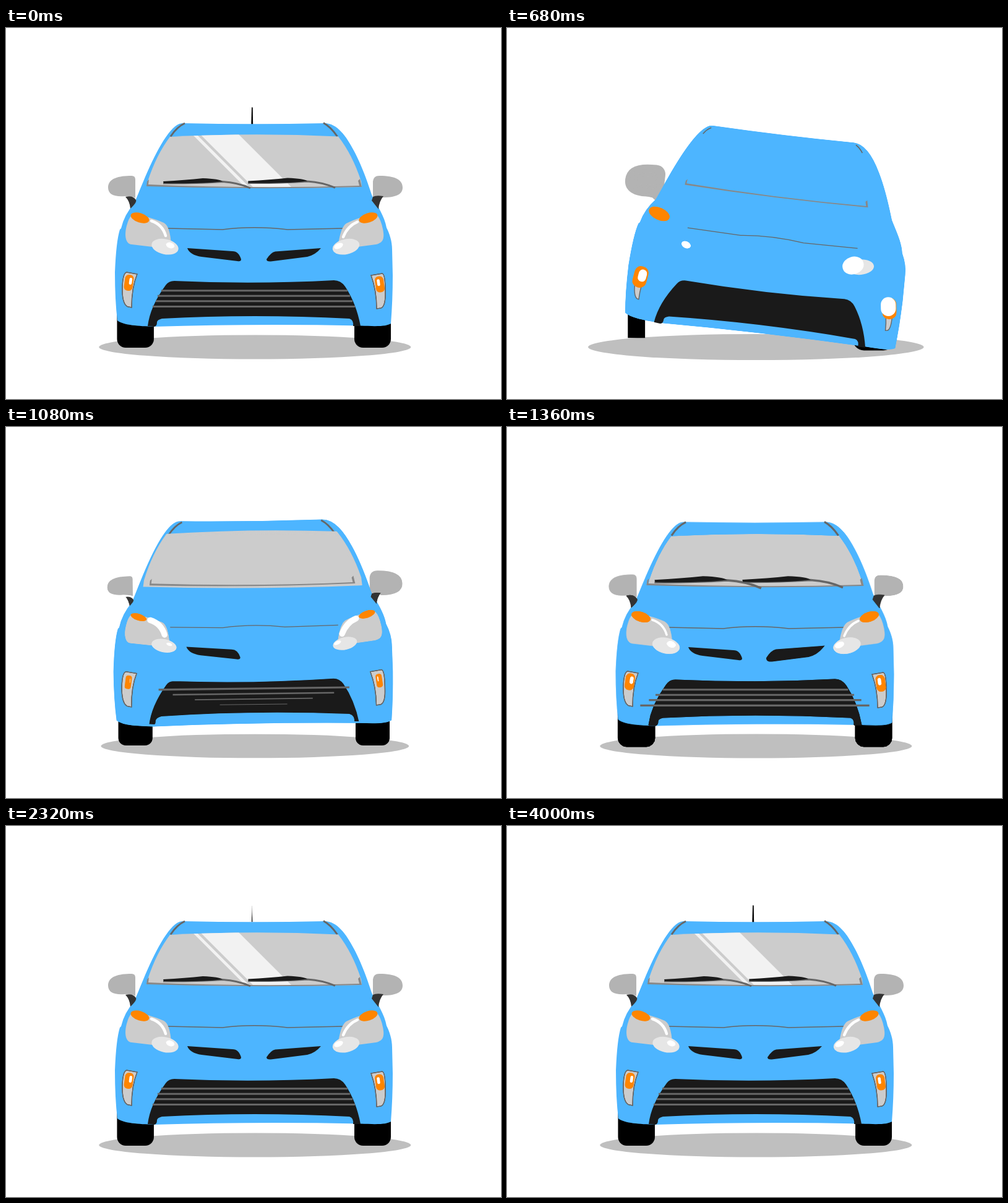
Animation of 800x600 px, one loop 4020 ms. Source, as an HTML page with a canvas:

```html
<!DOCTYPE html>
<html lang="en">
<head>
<meta charset="utf-8">
<title>Car assembly</title>
<style>
html, body { margin: 0; height: 100%; overflow: hidden; background: #fff; }
canvas { display: block; }
</style>
</head>
<body>
<canvas id="stage" width="800" height="600"></canvas>
<script>
const LOOP = 4020, STEP = 20;
const BLUE = '#4db5ff', ORANGE = '#ff8500', DARK = '#1a1a1a', GREY = '#ccc', LINE = '#666';
const ctx = document.getElementById('stage').getContext('2d');
const scratch = new OffscreenCanvas(800, 600).getContext('2d');

// Geometry helpers
const shape = d => new Path2D(d);
function ellipse(x, y, rx, ry, deg) {
  const p = new Path2D();
  p.ellipse(x, y, rx, ry, deg * Math.PI / 180, 0, 2 * Math.PI);
  return p;
}
function pill(x, y, w, h, r, deg = 0) {
  const box = new Path2D(), p = new Path2D();
  box.roundRect(-w / 2, -h / 2, w, h, r);
  p.addPath(box, new DOMMatrix().translate(x, y).rotate(deg));
  return p;
}

// Motion helpers
const spring = (age, k = 120, period = 560) =>
  age < 0 ? -1 : -(2 ** (-age / k)) * Math.cos(2 * Math.PI * age / period);

// Value through [time, value] keys: quick start, then soft swings
function track(t, keys) {
  if (t <= keys[0][0]) return keys[0][1];
  for (let i = 1; i < keys.length; i++) {
    const [t0, a] = keys[i - 1], [t1, b] = keys[i];
    if (t < t1) {
      const p = (t - t0) / (t1 - t0);
      const e = i === 1 ? Math.sin(p * Math.PI / 2) : (1 - Math.cos(p * Math.PI)) / 2;
      return a + (b - a) * e;
    }
  }
  return keys.at(-1)[1];
}

// Nested strokes close the gaps a single wide stroke leaves on tight curves
function strokeBand(c, path, reach) {
  for (const part of [1, 0.75, 0.5, 0.25]) {
    c.lineWidth = 2 * reach * part;
    c.stroke(path);
  }
}

// Fills a path grown (d > 0) or shrunk (d < 0) by d pixels along its outline
function fillOffset(path, color, d) {
  if (d >= 0) {
    ctx.fillStyle = ctx.strokeStyle = color;
    ctx.fill(path);
    if (d > 0.05) strokeBand(ctx, path, d);
    return;
  }
  scratch.resetTransform();
  scratch.clearRect(0, 0, 800, 600);
  scratch.setTransform(ctx.getTransform());
  scratch.fillStyle = color;
  scratch.fill(path);
  if (d < -0.05) {
    scratch.globalCompositeOperation = 'destination-out';
    strokeBand(scratch, path, -d);
    scratch.globalCompositeOperation = 'source-over';
  }
  ctx.save();
  ctx.resetTransform();
  ctx.drawImage(scratch.canvas, 0, 0);
  ctx.restore();
}

// Part kinds; each returns a function of time
const solid = (start, color, path) => t => {
  if (t >= start) fillOffset(path, color, 50 * spring(t - start));
};
const outlined = (start, path) => t => {
  if (t < start) return;
  const d = 70 * spring(t - start);
  fillOffset(path, LINE, d + 0.7);
  fillOffset(path, GREY, d - 0.7);
};
const streak = (start, path) => t => {
  const width = 4.5 + 100 * spring(t - start);
  if (width <= 0) return;
  ctx.lineCap = 'round';
  ctx.strokeStyle = '#fff';
  ctx.lineWidth = width;
  ctx.stroke(path);
  ctx.lineCap = 'butt';
};
const pop = (start, x, y, paint) => t => {
  if (t <= start) return;
  const s = 1 + spring(t - start);
  ctx.save();
  ctx.translate(x, y);
  ctx.scale(s, s);
  ctx.translate(-x, -y);
  paint();
  ctx.restore();
};
const line = (start, x, y, width, d) => {
  const path = shape(d);
  return pop(start, x, y, () => {
    ctx.strokeStyle = LINE;
    ctx.lineWidth = width;
    ctx.stroke(path);
  });
};

const bodyPath = shape('M287,154Q400,156.5 515,154C535,154 550,175 562,198C578,228 587,258 592,272C600,287 612,305 615,323C620,333 624,345 624,358L625,400Q625,440 622,478C615,482 605,483 573,481.5Q402,478 238,483C215,482 190,481 180,473Q176,440 176,395Q178,345 184,326L186,324Q191,302 207,284C211,275 216,262 222,248C240,205 262,162 280,155Q283,154 287,154Z');
const glass = shape('M265,176Q400,169 537,175.5Q560,205 574,248L575,257Q400,262 228,255L229,248Q243,205 265,176Z');
const strip = shape('M227,256L228,248L231,245L230,253Q400,260.5 571,255L569,247L572,244L575,257Q400,262 227,256Z');

const body = t => {
  if (t >= 200) fillOffset(bodyPath, BLUE, 226 * spring(t - 200, 120, 2000));
};

const shines = [
  solid(1230, '#f2f2f2', shape('M301,172L308,172L396,260L389,260Z')),
  solid(1310, '#f2f2f2', shape('M314,172L376,172L464,260L402,260Z'))
];
const reflection = t => {
  ctx.save();
  ctx.clip(glass);
  shines.forEach(draw => draw(t));
  ctx.restore();
};

const blade = shape('M254,248Q290,246 318,243Q345,244 350,248Q320,252 255,251Z');
const arm = shape('M254,251Q300,251.5 350,248.5Q375,250 395,259');
const wiper = (start, dx) => pop(start, 324 + dx, 251, () => {
  ctx.translate(dx, -dx / 270);
  ctx.strokeStyle = LINE;
  ctx.lineWidth = 3;
  ctx.stroke(arm);
  ctx.fillStyle = DARK;
  ctx.fill(blade);
});

const bars = [[251, 552, 424.7], [245, 556, 433.2], [242, 560, 441.7], [237, 564, 450.4]].map(
  ([x0, x1, y], i) => line(935 + 33 * i, (x0 + x1) / 2, y, 3, `M${x0},${y}H${x1}`));

const wheels = [
  solid(590, '#000', pill(209.2, 478.5, 59.5, 77, 14)),
  solid(520, '#000', pill(592.5, 478.5, 59, 77, 14))
];

const carParts = [
  solid(1670, '#000', shape('M396.3,156L397,129Q397.8,127 398.7,129L399.2,156Z')),
  solid(480, '#b3b3b3', shape('M165,258C165,243 182,239 203,239Q209,239 209,245L209,275Q205,272 192,272Q165,274 165,258Z')),
  solid(700, '#b3b3b3', shape('M593,275L593,248Q594,239 603,239C630,239 641,246 641,258C641,268 632,274 610,274Q600,271 593,275Z')),
  body,
  solid(620, '#333', shape('M193,273Q205,270 210,278Q212,282 201,292Q200,280 193,273Z')),
  solid(640, '#333', shape('M610,272Q598,270 593,273L591,279L602,293Q603,280 610,272Z')),
  line(610, 277, 164, 3, 'M266,175.5Q276,160 289,154'),
  line(610, 525, 164, 3, 'M513,153.5Q525,160 535.5,175.5'),
  solid(710, GREY, glass),
  reflection,
  pop(565, 401, 252, () => {
    ctx.fillStyle = '#888';
    ctx.fill(strip);
  }),
  wiper(1110, 0),
  wiper(1180, 137),
  line(545, 403, 324, 1.3, 'M261,324L350,326Q400,319.5 455,326L545,324'),
  solid(640, GREY, shape('M203,303C215,301 240,308 255,315Q265,320 267,350L262,357L203,350C193,349 191,335 195,320Q198,308 203,303Z')),
  solid(650, GREY, shape('M600,303C585,302 565,308 550,316Q541,322 537,350L545,357L598,350C610,347 612,340 609,325Q606,310 600,303Z')),
  solid(530, ORANGE, ellipse(216.5, 307, 15.5, 7.6, 18)),
  solid(610, ORANGE, ellipse(585.5, 307, 15.5, 7.6, -18)),
  streak(700, shape('M235,312Q253,318 258,336')),
  streak(700, shape('M568,313.5Q552,320 545,338')),
  solid(620, '#e6e6e6', ellipse(257, 353.7, 22, 12.3, 12)),
  solid(540, '#e6e6e6', ellipse(549.5, 353.7, 22, 12.3, -12)),
  solid(537, '#fff', ellipse(265.5, 351.5, 7, 4.6, 18)),
  solid(480, '#fff', ellipse(537.5, 352.5, 7.6, 4.3, -25)),
  solid(940, DARK, shape('M293,356L366,361Q376,361 380,374Q380,378 374,377L316,370Q297,367 293,356Z')),
  solid(975, DARK, shape('M509,356L435,361.5Q428,363 421,374Q421,378 428,377.5L487,370Q500,367 509,356Z')),
  outlined(140, shape('M195,395L212,398Q203,420 203,452L196,450.5Q187,445 188,418Q189,396 195,395Z')),
  outlined(140, shape('M590,400L608,397Q613,398 613,425Q614,450 606,453L599,454Q599,425 590,400Z')),
  solid(520, ORANGE, pill(198.5, 412, 14, 26, 6, 8)),
  solid(520, ORANGE, pill(604, 414.5, 14, 26, 6, -8)),
  solid(520, '#fff', pill(201.4, 409.5, 4.6, 11, 2.2, 8)),
  solid(480, '#fff', pill(602, 411.7, 4.6, 11, 2.2, -8)),
  solid(540, DARK, shape('M272,409Q400,415 530,408Q541,408 548,418Q566,445 573,482L561,482Q562,472 555,470Q400,462 252,470Q244,472 244,476Q244,483 239,483L229,482Q233,450 258,416Q263,409 272,409Z')),
  ...bars
];

function drawShadow(t) {
  const s = track(t, [[244, 0], [700, 1.079], [1060, 0.987], [1250, 1]]);
  ctx.fillStyle = '#bfbfbf';
  ctx.fill(ellipse(402.3, 516, 252 * s, 19.6 * s, 0));
}

function render(t) {
  ctx.resetTransform();
  ctx.fillStyle = '#fff';
  ctx.fillRect(0, 0, 800, 600);
  drawShadow(t);
  wheels.forEach(draw => draw(t));

  const angle = track(t, [[244, -55.7], [640, 7.4], [900, -1.6], [1240, 0]]);
  const dx = track(t, [[244, 1], [640, 8], [900, 0]]);
  const dy = track(t, [[244, -230], [640, 15.6], [900, -4], [1240, 0]]);
  ctx.translate(402 + dx, 480 + dy);
  ctx.rotate(angle * Math.PI / 180);
  ctx.translate(-402, -480);
  carParts.forEach(draw => draw(t));
}

const begin = performance.now();
function tick() {
  const t = Math.floor((performance.now() - begin) % LOOP / STEP) * STEP;
  render(t < STEP ? LOOP : t); // the loop opens on the finished car
  requestAnimationFrame(tick);
}
tick();
</script>
</body>
</html>
```
